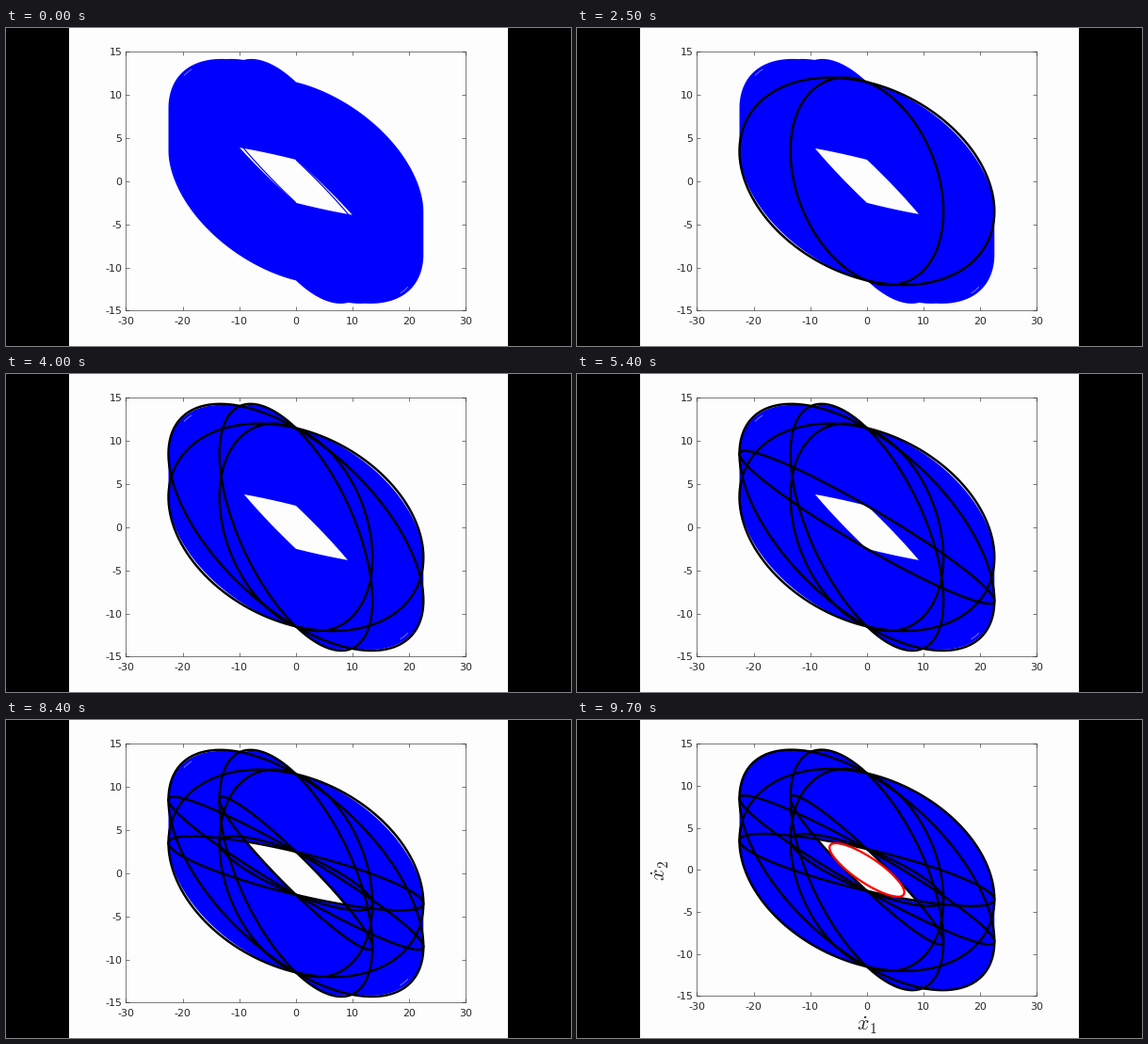
Write a matplotlib script that moves like this. It is 600x338 px and loops after 10 s.

```python
import numpy as np
import matplotlib.pyplot as plt
from matplotlib.animation import FuncAnimation
from matplotlib.patches import Rectangle

W, H, DPI = 600, 338, 100
PX = 72 / DPI  # points per pixel
PAPER, INK = "#fdfdfd", "#262626"

plt.rcParams.update({
    "font.family": "DejaVu Sans",
    "mathtext.fontset": "cm",
    "axes.unicode_minus": False,
})

# Interval bounds of the system matrix [[a, 0], [-c, d]]
A_MIN, A_MAX = 13.5, 22.5
C_MIN, C_MAX = 3.5, 8.5
D_MIN, D_MAX = 2.5, 11.5


def image_of_circle(a, c, d, start=0.0, stop=2 * np.pi, scale=1.0):
    t = np.linspace(start, stop, 400)
    return scale * a * np.cos(t), scale * (d * np.sin(t) - c * np.cos(t))


def symmetric(x, upper, lower):
    """Outline from its left half, reflected through the origin."""
    x = np.r_[-x, -x[::-1]]
    y = np.r_[upper, lower[::-1]]
    return np.column_stack([np.r_[x, -x], np.r_[y, -y]])


def arc(s, power=2.0):
    """Quarter circle; a power below 2 flattens it, as sparse samples do."""
    return (1 - np.clip(s, 0, 1)**power)**(1 / power)


def outer_outline(shoulder=2.0, side=2.0):
    x = A_MAX * np.sin(np.linspace(0, np.pi / 2, 400))
    r = x / A_MAX
    curves = [np.where(x <= a, C_MAX * x / a + D_MAX * arc(x / a, shoulder), 0)
              for a in (A_MIN, 19.5, A_MAX)]
    return symmetric(x, np.max(curves, axis=0),
                     C_MIN * r - D_MAX * arc(r, side))


def hole_outline(a, c):
    x = np.linspace(0, 12, 1200)
    upper = c * x / A_MAX + D_MIN * arc(x / A_MAX)
    lower = C_MAX * x / a - D_MIN * arc(x / a)
    keep = upper >= lower
    return symmetric(x[keep], upper[keep], lower[keep])


def box(top, bottom):
    return [127.4 / W, 1 - bottom / H, 361 / W, (bottom - top) / H]


PLAIN_BOX, LABELLED_BOX = box(25.4, 300.4), box(25.4, 293.4)

fig = plt.figure(figsize=(W / DPI, H / DPI), dpi=DPI, facecolor=PAPER)
for left in (0, 533):
    fig.add_artist(Rectangle((left / W, 0), 67 / W, 1, color="black", lw=0,
                             transform=fig.transFigure))

ax = fig.add_axes(PLAIN_BOX, facecolor=PAPER)
ax.set(xlim=(-30, 30), ylim=(-15, 15),
       xticks=range(-30, 31, 10), yticks=range(-15, 16, 5))
ax.tick_params(direction="in", top=True, right=True, length=3.6 * PX,
               width=0.6 * PX, color=INK, labelcolor=INK, labelsize=11 * PX)
ax.tick_params(axis="x", pad=7 * PX)
ax.tick_params(axis="y", pad=4 * PX)
for spine in ax.spines.values():
    spine.set(linewidth=0.6 * PX, color=INK)


def line(points, color, width, **kw):
    return ax.plot(*points, color=color, lw=width * PX,
                   solid_capstyle="butt", **kw)[0]


def area(outline, color, zorder):
    return ax.add_patch(plt.Polygon(outline, fc=color, lw=0, zorder=zorder))


sampled_region = area(outer_outline(1.95, 1.89), "blue", 1)
full_region = area(outer_outline(), "blue", 1)
hole = area(hole_outline(13.7, 3.75), PAPER, 1.1)

# Sparse first pass: a wider hole crossed by single thin arcs
sparse = [area(hole_outline(14.7, 3.75), PAPER, 1.1)]
gaps = []
for turn in (0, np.pi):
    sparse.append(line(image_of_circle(13.8, C_MAX, D_MIN, 0.8 + turn,
                                       1.57 + turn), "blue", 1.2, zorder=1.2))
    gaps.append(line(image_of_circle(A_MAX, C_MAX, D_MAX, 2.57 + turn,
                                     2.7 + turn, 0.972),
                     PAPER, 0.6, alpha=0.7, zorder=1.3))

CORNERS = [(a, c, d)
           for c, d in ((C_MIN, D_MAX), (C_MAX, D_MAX),
                        (C_MAX, D_MIN), (C_MIN, D_MIN))
           for a in (A_MAX, A_MIN)]
ellipses = [line(image_of_circle(*corner), "black", 2.5, zorder=2)
            for corner in CORNERS]
inscribed = line(image_of_circle(6.6, 2.65, 1.77), "red", 2.3, zorder=3)

label_style = dict(fontsize=22 * PX, color=INK, ha="center", va="baseline",
                   rotation_mode="anchor")
labels = [
    fig.text(308 / W, 1 - 330 / H, r"$\dot{x}_1$", **label_style),
    fig.text(94 / W, 1 - 159.5 / H, r"$\dot{x}_2$", rotation=90, **label_style),
]


def show(artists, visible):
    for artist in artists:
        artist.set_visible(visible)


def update(frame):
    second = frame // 10
    final = second >= 9
    ax.set_position(LABELLED_BOX if final else PLAIN_BOX)
    show(sparse, frame == 0)
    hole.set_visible(frame > 0)
    for i, ellipse in enumerate(ellipses):
        ellipse.set_visible(second > i)
    show([sampled_region, *gaps], not final)
    show([full_region, inscribed, *labels], final)
    return []


anim = FuncAnimation(fig, update, frames=100, interval=100, repeat=True,
                     repeat_delay=0, blit=False)
plt.show()
```
